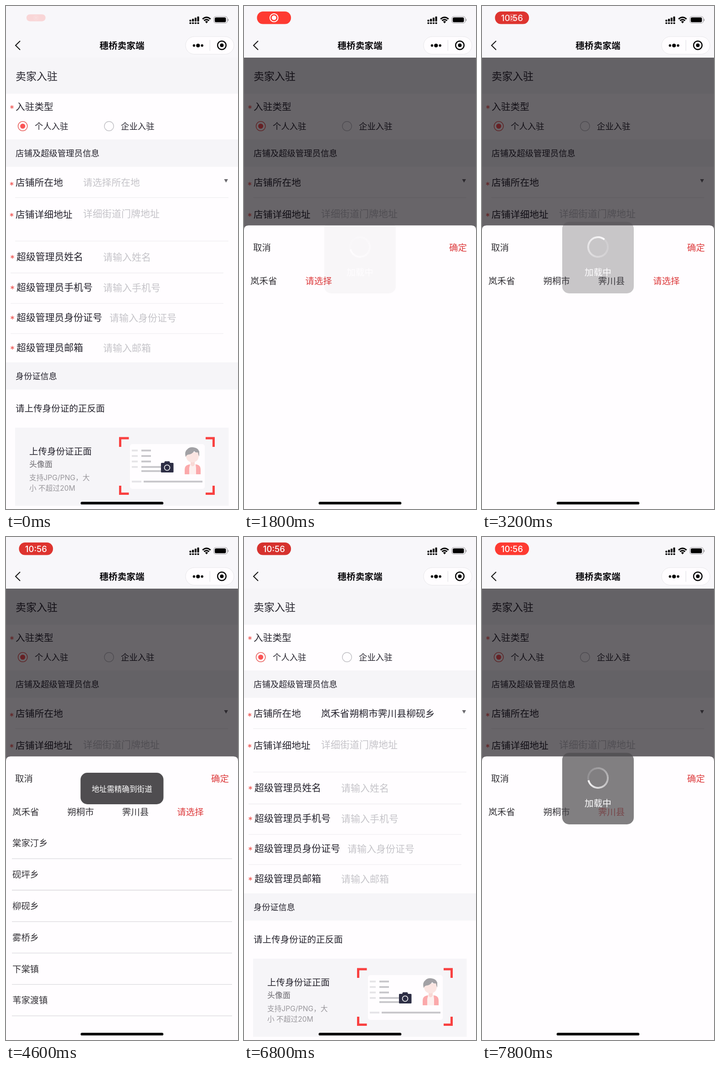
An HTML page for the animation above (8000 ms loop, 509 by 1101 pixels).

```html
<!DOCTYPE html>
<html lang="zh-CN">
<head>
<meta charset="utf-8">
<title>卖家入驻</title>
<style>
html, body { margin: 0; width: 100%; height: 100%; overflow: hidden; background: #fffdff; }
svg { display: block; width: 100%; height: 100%; font-family: Inter, "Noto Sans CJK SC", "Noto Sans CJK", sans-serif; }
</style>
</head>
<body>
<svg id="stage" viewBox="0 0 509 1101"></svg>
<script>
const LOOP = 8000, STEP = 200;
const WHITE = '#fffdff', GRAY = '#f6f5f8', INK = '#25232d', HINT = '#c5c4c9', RED = '#dd3b3d', STAR = '#ef5552';

// Place names
const PROVINCES = ['松霭省', '岚禾省', '曜泽省', '芷棠省', '雁汐省', '澜桉省'];
const CITIES = ['霜桐市', '榆澈市', '朔桐市', '苓远市', '砂棠市', '沐岑市'];
const COUNTIES = ['霁川县', '栎塘县', '芦荻县', '樱坞县', '杉汀县', '槐埠县'];
const TOWNS = ['棠家汀乡', '砚坪乡', '柳砚乡', '雾桥乡', '下棠镇', '苇家渡镇'];
const [PROV, CITY, COUNTY, TOWN] = [PROVINCES[1], CITIES[2], COUNTIES[0], TOWNS[2]];
const PICK = '请选择';

// Picker states: start, tabs, rows, chosen row (the last tab is red)
const PICKER = [
  [0, [PICK], []],
  [1000, [PICK], PROVINCES],
  [1600, [PROV], PROVINCES, PROV],
  [1800, [PROV, PICK], []],
  [2200, [PROV, PICK], CITIES],
  [2600, [PROV, CITY, PICK], []],
  [2800, [PROV, CITY, PICK], COUNTIES],
  [3200, [PROV, CITY, COUNTY, PICK], []],
  [3600, [PROV, CITY, COUNTY, PICK], TOWNS],
  [5600, [PROV, CITY, COUNTY, TOWN], TOWNS, TOWN],
  [7600, [PROV, CITY, COUNTY], []]
];
const OPEN = [[200, 0], [600, 1], [6200, 1], [6600, 0], [6800, 0], [7200, 1]];
const LOADING = [[600, 0], [800, .8], [1000, 0], [1780, 0], [1800, .03], [2000, .8], [2200, 0], [2400, 0],
  [2600, .7], [2800, 0], [3000, 0], [3200, .3], [3400, .8], [3600, 0], [7600, 0], [7800, .7]];
const TOAST = [[4000, 0], [4200, .8], [4400, .98], [5200, .98], [5400, 0]];

const mix = (a, b, k) => a + (b - a) * k;
const clamp = k => Math.max(0, Math.min(1, k));

function track(keys, t) {
  const i = keys.findIndex(k => k[0] > t);
  if (i < 0) return keys[keys.length - 1][1];
  if (!i) return keys[0][1];
  const [t0, a] = keys[i - 1], [t1, b] = keys[i];
  return mix(a, b, (t - t0) / (t1 - t0));
}

// Text is placed by its left edge and vertical centre
const text = (x, y, size, fill, s, more = '') =>
  `<text x="${x}" y="${y + size * .38}" font-size="${size}" fill="${fill}" ${more}>${s}</text>`;
const rect = (x, y, w, h, fill, rx = 0, more = '') =>
  `<rect x="${x}" y="${y}" width="${w}" height="${h}" fill="${fill}" rx="${rx}" ${more}/>`;
const disc = (x, y, r, fill) => `<circle cx="${x}" cy="${y}" r="${r}" fill="${fill}"/>`;
const ring = (x, y, r, stroke, w) =>
  `<circle cx="${x}" cy="${y}" r="${r}" fill="none" stroke="${stroke}" stroke-width="${w}"/>`;
const line = (d, stroke, w, more = '') =>
  `<path d="${d}" fill="none" stroke="${stroke}" stroke-width="${w}" ${more}/>`;
const shape = (d, fill) => `<path d="${d}" fill="${fill}"/>`;
const star = (x, y) => `<text x="${x}" y="${y + 11}" font-size="20" text-anchor="middle" fill="${STAR}">*</text>`;
const group = (more, s) => `<g ${more}>${s}</g>`;

function idCard() {
  const bars = [973, 985, 997, 1009].map((y, i) =>
    rect(276, y - 2, 13, 4, '#e6e5e8') + rect(297, y - 2, i < 3 ? 21 : 44, 4, '#c9c8cc')).join('');
  return rect(20, 923, 468.5, 171, GRAY)
    + text(51, 975, 19.6, INK, '上传身份证正面')
    + text(51, 1003, 17, '#68666c', '头像面')
    + text(51, 1032, 15.7, '#99979c', '支持JPG/PNG，大')
    + text(51, 1055, 15.7, '#99979c', '小 不超过20M')
    + rect(272, 959, 164, 98, WHITE, 5)
    + bars + rect(297, 1016, 44, 4, '#c9c8cc')
    + rect(276, 1039, 21, 4, '#e6e5e8') + rect(302, 1039, 129, 4, '#c9c8cc')
    + shape('M340 1001.500q0-1.500 1.500-1.500h5.500l1.500-3.500h10l1.500 3.500h6q1.500 0 1.500 1.500v18q0 1.500-1.500 1.500h-24.500q-1.500 0-1.500-1.500z', '#2d2e45')
    + ring(353.5, 1010.5, 6, '#fff', 1.6)
    // figure
    + shape('M392 1025v-10q0-9 8-11l5-1h10l5 1q7 2 7 11v10z', '#fba9ab')
    + shape('M402 1025v-14l2-8h12l1 8v14z', '#fdf0ef')
    + shape('M405 994h9v10q-4.500 7-9 0z', '#f9d9d6')
    + shape('M395 977h28v8q-1 13-14 14q-13-1-14-14z', '#fbe5e2')
    + shape('M394 987q-3-12 4-17q5-5 13-4q10 1 13 9v11q-2-3-3-9q-6 1-8-3q-4 7-14 8q-3 1-5 5z', '#a2a1a5')
    + line('M250.5 965v-19h19M438 946h17.5v19M250.5 1050v17.5h19M438 1067.5h17.5v-17.5', '#f94141', 5);
}

function form(t) {
  const filled = t >= 6200 && t < 7000;
  const place = filled ? PROV + CITY + COUNTY + TOWN : t < 400 ? '请选择所在地' : '';
  const fields = [
    [549, '姓名', 213], [615.5, '手机号', 213], [682, '身份证号', 227], [748, '邮箱', 213]
  ].map(([y, name, x]) => star(14, y) + text(23, y - .5, 20.9, INK, '超级管理员' + name)
    + text(x, y + .5, 21, HINT, '请输入' + name)).join('');
  return rect(0, 0, 509, 192, GRAY) + rect(0, 292, 509, 60, GRAY) + rect(0, 780, 509, 59.5, GRAY)
    + text(21, 153, 23, INK, '卖家入驻')
    + star(13, 221) + text(21, 220.5, 20.7, INK, '入驻类型')
    + ring(36.7, 263, 10.2, '#e8605e', 1.5) + disc(36.7, 263, 5.6, '#fb5455') + text(63, 263, 18.4, INK, '个人入驻')
    + ring(226, 263, 10.2, '#c2c1c6', 1.4) + text(252, 263, 18.4, INK, '企业入驻')
    + text(21, 322, 18.4, INK, '店铺及超级管理员信息')
    + star(12.5, 388.5) + text(21, 386, 20.8, INK, '店铺所在地')
    + text(169, 386, 20.8, filled ? INK : HINT, place)
    + shape('M478.500 379h8.500l-4.250 7.500z', '#6a686d')
    + star(12.5, 456.5) + text(21, 456, 20.8, INK, '店铺详细地址')
    + text(169, 454.5, 21, HINT, '详细街道门牌地址')
    + fields
    + line('M20 419.500H488M20 514.500H488M10 584.300H477M10 651H477M10 717H477', '#ebeaed', 1.2)
    + text(21, 810, 18.2, INK, '身份证信息')
    + text(21, 881, 19.6, INK, '请上传身份证的正反面')
    + idCard();
}

function picker(t) {
  const [, tabs, rows, chosen] = PICKER.filter(s => s[0] <= t).pop();
  return shape('M0 1101V490.300q0-10 10-10H499q10 0 10 10V1101z', WHITE)
    + text(20, 528.5, 19.5, '#333136', '取消') + text(450, 528.5, 19.5, RED, '确定')
    + tabs.map((s, i) => text(14 + i * 120.4, 602, 19.5, i == tabs.length - 1 ? RED : '#333136', s)).join('')
    + rows.map((s, i) => text(14, 670 + i * 68.8, 19.4, s == chosen ? RED : '#333136', s)
      + line(`M13 ${704.2 + i * 68.8}H496`, '#dad9dd', 1.3)).join('');
}

function loader(t) {
  let arcs = '';
  const head = 40 + (t - 3200) * .36;
  for (let i = 0; i < 30; i++)
    arcs += line('M0-21.500A21.500 21.500 0 0 1 4.700-20.980', '#fff', 4,
      `opacity="${.14 + .8 * (i / 29) ** 1.6}" transform="rotate(${head - 360 + i * 12})"`);
  return rect(176, 472.5, 157, 156.5, '#4c4a4d', 15)
    + group('transform="translate(254.5 527.5)"', arcs)
    + text(225, 582.5, 19.6, '#fff', '加载中');
}

const toast = () => rect(163.5, 516, 182, 69, '#4c4a4d', 15) + text(188, 551.5, 16.6, '#fff', '地址需精确到街道');

function pill(t) {
  const grow = clamp(t / 400);
  const dim = .5 - .5 * Math.cos((t - 1900) / 1000 * Math.PI);
  const fill = `rgb(${mix(255, 213, dim)},${mix(58, 50, dim)},${mix(49, 46, dim)})`;
  const swap = track([[3000, 0], [3200, .7], [3400, 1]], t);
  return group(`transform="translate(65.8 25.8) scale(${mix(.56, 1, grow)})" opacity="${mix(.17, 1, grow)}"`,
    rect(-37.3, -13.7, 74.6, 27.4, fill, 13.2)
    + group(`opacity="${(1 - swap) * mix(.2, 1, grow)}" transform="scale(${1 - swap * .25})"`,
      ring(0, 0, 8.8, '#fff', 2) + disc(0, 0, 5, '#fff'))
    + text(0, .2, 18.6, '#fff', '10:56', `text-anchor="middle" font-weight="500" opacity="${Math.min(1, swap * 1.3)}"`));
}

function header(t) {
  const signal = [4, 6, 8.5, 11].map((h, i) => rect(402.5 + i * 5.7, 34 - h, 4, h, '#000', 1)
    + rect(402.5 + i * 5.7, 35.8, 4, 3.4, '#000', 1)).join('');
  return rect(0, 0, 509, 113, '#f8f7fa') + pill(t) + signal
    + line('M431.300 28.500q8.700-7.600 17.400 0M434.500 32q5.500-4.600 11 0', '#000', 3)
    + shape('M436.800 34.300q3.200-2.400 6.400 0L440 38z', '#000')
    + rect(456, 23, 29.5, 14.5, 'none', 4.5, 'stroke="#9b9a9d" stroke-width="1.2"')
    + rect(458, 25, 24.5, 10.5, '#000', 2.8) + rect(486.7, 28, 1.6, 5, '#9b9a9d', .8)
    + line('M31 76.500L21 86.200L31 96', '#111', 2)
    + text(254.5, 86.3, 19.7, '#0b0a0d', '穗桥卖家端', 'text-anchor="middle" font-weight="700"')
    + rect(394, 67, 106, 38.5, WHITE, 19.2, 'stroke="#e8e7ea"')
    + line('M447.300 74.500V98', '#dddce0', 1)
    + disc(412.5, 86.5, 2.7, '#000') + disc(421.3, 86.5, 4.1, '#000') + disc(430.2, 86.5, 2.7, '#000')
    + ring(473.5, 86, 9.3, '#000', 2.5) + disc(473.5, 86, 4, '#000');
}

function draw(t) {
  const open = track(OPEN, t), rise = 1 - (1 - open) ** 2;
  return rect(0, 0, 509, 1101, WHITE) + form(t)
    + rect(0, 113, 509, 988, '#040005', 0, `opacity="${.6 * open}"`)
    + (open ? group(`transform="translate(0 ${(1 - rise) * 620})"`, picker(t)) : '')
    + group(`opacity="${track(LOADING, t)}"`, loader(t))
    + group(`opacity="${track(TOAST, t)}"`, toast())
    + header(t)
    + rect(163.7, 1085.2, 181.6, 5.9, '#000', 2.9);
}

const stage = document.getElementById('stage');
let shown = -1;
function tick() {
  const t = Math.floor(performance.now() % LOOP / STEP) * STEP;
  if (t != shown) stage.innerHTML = draw(shown = t);
  requestAnimationFrame(tick);
}
tick();
</script>
</body>
</html>
```
